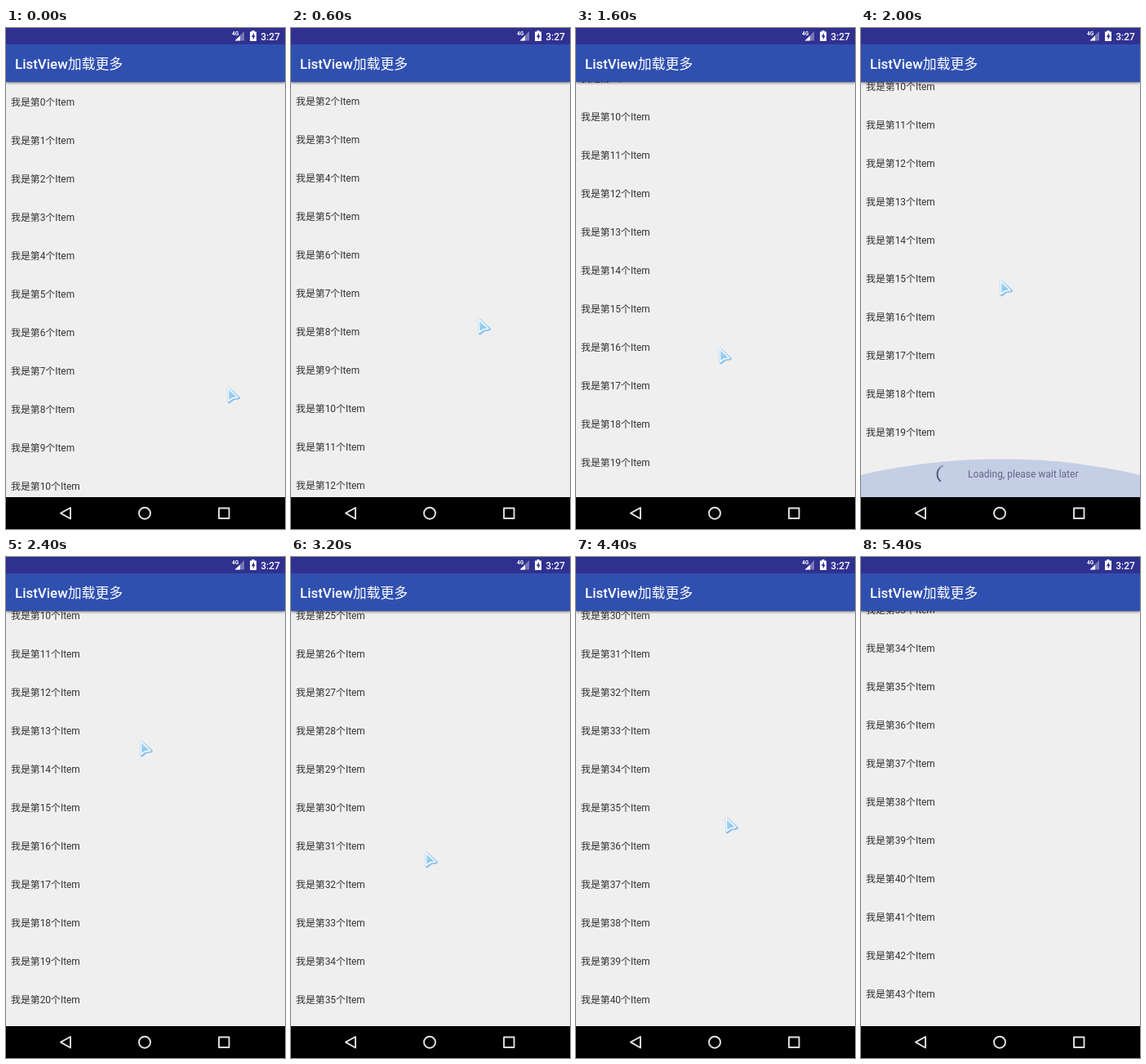
These frames come from a looping animation (342x613 px, 5600 ms). An HTML page:

```html
<!DOCTYPE html>
<html lang="zh-CN">
<head>
<meta charset="utf-8">
<title>ListView</title>
<style>
  html, body { margin: 0; width: 100%; height: 100%; overflow: hidden; background: #000; }
  body { font-family: Roboto, "Noto Sans CJK SC", "Noto Sans CJK", sans-serif; }
  #stage { position: relative; width: 342px; height: 613px; overflow: hidden; }
  #stage > *, #list > *, .row { position: absolute; }
  #status { left: 0; top: 0; background: #303090; }
  #bar {
    left: 0; top: 20px; width: 331px; height: 46px; padding-left: 11px;
    background: #3050b0; box-shadow: 0 1px 3px rgba(0, 0, 0, .6);
    color: #fff; font-size: 16.9px; font-weight: 500; line-height: 49px; white-space: nowrap;
  }
  #bar span { font-weight: 400; }
  #view { left: 0; top: 66px; width: 342px; height: 508px; overflow: hidden; background: #efefef; }
  #list { position: absolute; left: 0; top: 2px; width: 342px; }
  .row { left: 6px; height: 47px; font-size: 11.9px; line-height: 47px; color: #333; white-space: nowrap; }
  #footer { left: 0; width: 342px; height: 55px; font-size: 12px; line-height: 54px; color: #756a74; }
  #footer span { position: absolute; left: 131px; white-space: nowrap; }
  #footer svg { position: absolute; left: 91px; top: 12.5px; }
  #glow { position: absolute; left: 0; bottom: 0; transform-origin: 50% 100%; }
  #nav { left: 0; top: 574px; background: #000; }
  #cursor { left: 0; top: 0; overflow: visible; }
</style>
</head>
<body>
<div id="stage">
  <div id="view">
    <div id="list">
      <div id="footer">
        <svg width="28" height="28" viewBox="-14 -14 28 28">
          <defs>
            <linearGradient id="fade">
              <stop offset="0" stop-color="#57586a" stop-opacity=".3"/>
              <stop offset=".6" stop-color="#57586a"/>
            </linearGradient>
          </defs>
          <path id="arc" d="M11.3 2A11.5 11.5 0 0 1 -7.4 8.8" fill="none" stroke="url(#fade)" stroke-width="2"/>
        </svg>
        <span>Loading, please wait later</span>
      </div>
    </div>
    <svg id="glow" width="342" height="70"><circle cx="171" cy="513" r="513" fill="rgb(48,90,195)" fill-opacity=".33"/></svg>
  </div>
  <div id="bar">ListView<span>加载更多</span></div>
  <svg id="status" width="342" height="20">
    <text x="277" y="9" font-size="6.5" font-weight="700" fill="#fff">4G</text>
    <path d="M292 4V15.500H280.500Z" fill="#fff" fill-opacity=".35"/>
    <path d="M287 9.500V15.500H280.500Z" fill="#fff"/>
    <path d="M301.500 3H304.500V4.500H307V16H299V4.500H301.500Z" fill="#fff"/>
    <path d="M304 6L300.800 11H302.700V14.500L305.500 9.500H304Z" fill="#303090"/>
    <text x="312.300" y="15" font-size="12" font-weight="500" fill="#fff">3:27</text>
  </svg>
  <svg id="nav" width="342" height="39" fill="none" stroke="#e2e2e2" stroke-width="1.900" stroke-linejoin="round">
    <path d="M79 13V26.500L67 19.700Z"/>
    <circle cx="170" cy="19.700" r="7"/>
    <rect x="261" y="13.500" width="12.500" height="12.500"/>
  </svg>
  <svg id="cursor" width="20" height="24" stroke-linejoin="round">
    <defs>
      <linearGradient id="ice" x2=".7" y2="1">
        <stop offset="0" stop-color="#b5dff6"/>
        <stop offset="1" stop-color="#78bcec"/>
      </linearGradient>
    </defs>
    <path d="M2.500 3L15 14.500L8.500 15.500L3.500 19.500Z" fill="#86bdec" stroke="#86bdec" stroke-width="3.600"/>
    <path d="M2 2.200L14 13.800L7.800 14.800L2.700 18.500Z" fill="url(#ice)" stroke="#f3faff" stroke-width="1.700"/>
  </svg>
</div>
<script>
const STEP = 200, STEPS = 28, ROW = 47, PAGE = 20;
const $ = id => document.getElementById(id);
const clamp = v => Math.min(1, Math.max(0, v));

// Times are counted in steps. Power 1 is a drag, 2 a fling that slows down.
const moves = [
  { from: 0, to: 5, by: 159, power: 1 },
  { from: 6, to: 9, by: 330, power: 2 },
  { from: 14, to: 18, by: 940, power: 2 },
  { from: 24, to: 27, by: 148, power: 1 },
];
const loads = [{ hit: 9, done: 12 }, { hit: 18, done: 22 }];
const stops = [[0, 270, 438], [5, 205, 308], [8, 174, 390], [12, 163, 223], [18, 163, 407], [22, 182, 317], [27, 176, 300]];

const scrollAt = step => moves.reduce((sum, m) =>
  sum + m.by * (1 - (1 - clamp((step - m.from) / (m.to - m.from))) ** m.power), 0);

const glowAt = step => Math.max(...loads.map(l => step < l.hit ? 0 : clamp(1 - (step - l.hit) / 3)));

function pointerAt(step) {
  const next = stops.findIndex(s => s[0] > step);
  if (next < 0) return null;
  const [t0, x0, y0] = stops[next - 1], [t1, x1, y1] = stops[next];
  const p = (step - t0) / (t1 - t0), ease = p * p * (3 - 2 * p);
  return [x0 + (x1 - x0) * ease, y0 + (y1 - y0) * ease];
}

const rows = Array.from({ length: 3 * PAGE }, (_, i) => {
  const row = document.createElement('div');
  row.className = 'row';
  row.style.top = i * ROW + 'px';
  row.textContent = `我是第${i}个Item`;
  return $('list').appendChild(row);
});

function draw(step) {
  const count = PAGE * (1 + loads.filter(l => step >= l.done).length);
  rows.forEach((row, i) => row.hidden = i >= count);
  $('footer').style.top = count * ROW + 'px';
  $('list').style.transform = `translateY(${-Math.round(scrollAt(step))}px)`;
  $('arc').setAttribute('transform', `rotate(${(step - 18) * 75})`);

  const glow = glowAt(step);
  $('glow').style.transform = `scaleY(${glow})`;
  $('glow').style.opacity = glow;

  const spot = pointerAt(step);
  $('cursor').style.visibility = spot ? 'visible' : 'hidden';
  if (spot) $('cursor').style.transform = `translate(${spot.map(v => Math.round(v) + 'px')})`;
}

const start = performance.now();
function tick() {
  draw(Math.floor((performance.now() - start) / STEP) % STEPS);
  requestAnimationFrame(tick);
}
tick();
</script>
</body>
</html>
```
